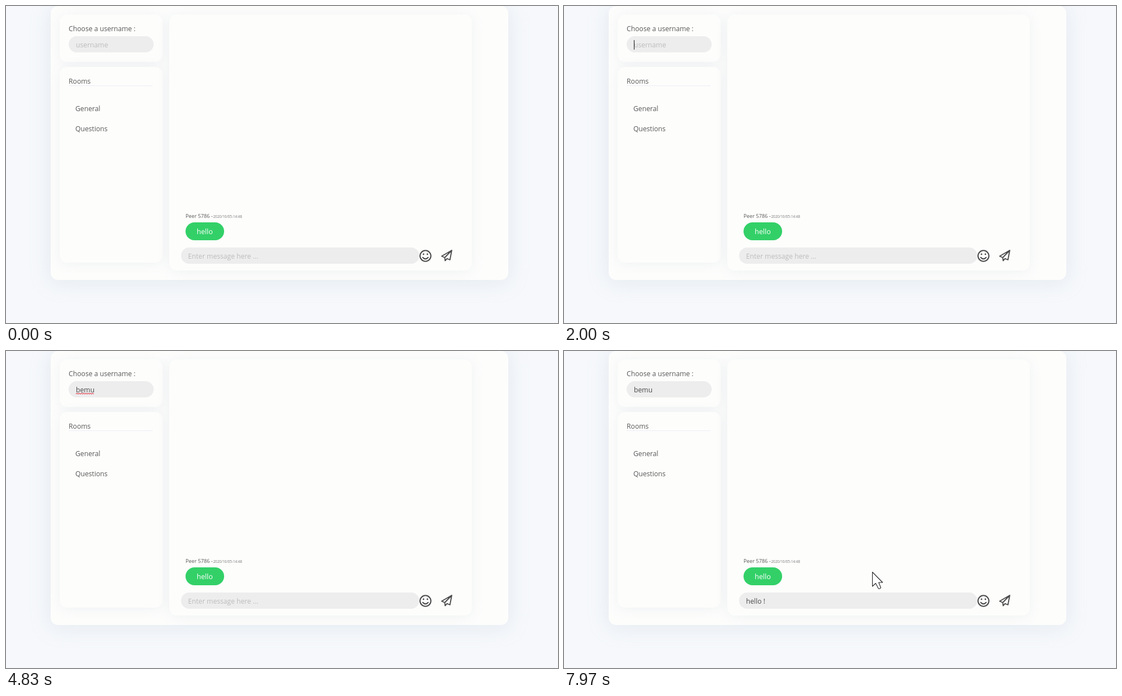
Recreate the animation shown at these times as an HTML page. Size 987 by 567 pixels, loop 8 s.

```html
<!DOCTYPE html>
<html lang="en">
<head>
<meta charset="utf-8">
<title>Chat room</title>
<style>
  html, body { margin: 0; width: 100%; height: 100%; overflow: hidden; background: #f6f8fb; }
  div { position: absolute; box-sizing: border-box; }
  .card { background: #fdfdfc; border-radius: 13px; box-shadow: 0 4px 36px rgba(176, 200, 214, .27); }
  .panel { background: #fdfdfc; border-radius: 13px; box-shadow: 0 2px 22px rgba(190, 200, 216, .22); }
  .field { background: #ededee; border-radius: 15px; }
  .bubble { background: #33d068; border-radius: 16px; }
  svg { position: absolute; left: 0; top: 0; }
  text { font: 12.2px "Open Sans", "Noto Sans", sans-serif; fill: #585858; white-space: pre; }
  .hint { fill: #bcbcbc; }
  .typed { fill: #484848; }
  .icon { fill: none; stroke: #4c4c4c; stroke-width: 2.1; stroke-linejoin: round; stroke-linecap: round; }
</style>
</head>
<body>
<div class="card" style="left:80px; top:0; width:818px; height:490px"></div>
<div class="panel" style="left:96px; top:15px; width:184px; height:85px"></div>
<div class="panel" style="left:96px; top:109px; width:184px; height:350px"></div>
<div class="panel" style="left:292px; top:15px; width:541px; height:458px"></div>
<div class="field" style="left:112px; top:54px; width:152px; height:29px"></div>
<div class="field" style="left:313px; top:432px; width:426px; height:29px"></div>
<div class="bubble" style="left:321px; top:387px; width:69px; height:32px"></div>

<svg width="987" height="567" viewBox="0 0 987 567">
  <text x="112" y="45">Choose a username :</text>
  <text x="112" y="139">Rooms</text>
  <path d="M112 142.5H262" stroke="#ececf6"/>
  <text x="124" y="188">General</text>
  <text x="124" y="224">Questions</text>
  <text x="321" y="379" style="font-size:9.25px">Peer 5786 -</text>
  <text x="370.5" y="379" style="font-size:6.3px; fill:#777">2020/10/05-14:48</text>
  <text x="341" y="408" style="font-size:12.6px; fill:#fff">hello</text>

  <text id="name" x="125" y="74"></text>
  <text id="message" x="325.5" y="452"></text>
  <path id="squiggle" fill="none" stroke="#e2525c" stroke-width="1.1"/>
  <path id="caret" stroke="#333" stroke-width="1.2"/>

  <g class="icon">
    <circle cx="750" cy="447" r="9.7"/>
    <path d="M745.2 449.8Q750 455 754.8 449.8"/>
    <path d="M746.5 444h.01M753.5 444h.01" stroke-width="2.8"/>
    <path d="M797 437L779 447.5 784.5 450 785.2 455.5 788.6 451.8 793.8 454ZM797 437L784.5 450" stroke-width="1.9"/>
  </g>
  <path id="pointer" d="M.5 .5V26L6.3 20.5 11.3 30Q14 31 15.5 28.2L11.7 19H18.7Z"
        fill="#fff" stroke="#222" stroke-width="1.1" stroke-linejoin="round"/>
</svg>

<script>
const LOOP = 8000, BLINK = 530;
const el = id => document.getElementById(id);
const caret = el('caret'), squiggle = el('squiggle'), pointer = el('pointer');

const nameField = {
  node: el('name'), hint: 'username', text: 'bemu', x: 125, caretY: 61,
  focus: 1700, blur: 5200, keys: [2500, 2680, 2860, 3040]
};
const messageField = {
  node: el('message'), hint: 'Enter message here ...', text: 'hello !', x: 325.5, caretY: 438,
  focus: 5200, blur: LOOP, keys: [6100, 6280, 6440, 6600, 6800, 7000, 7200]
};

// Pointer stops: time, x, y
const stops = [[3850, 190, 70], [4330, 468, 277], [4850, 500, 445], [7680, 500, 445], [7970, 551, 395]];
const SPELLCHECK = 3900;

function drawField(field, t) {
  const { node, hint, text, x, caretY, focus, blur, keys } = field;
  const typed = keys.filter(k => k <= t);
  node.textContent = typed.length ? text.slice(0, typed.length) : hint;
  node.setAttribute('class', typed.length ? 'typed' : 'hint');
  if (t < focus || t >= blur) return;

  const lastInput = typed.length ? typed[typed.length - 1] : focus;
  if ((t - lastInput) % (2 * BLINK) >= BLINK) return;
  const width = typed.length ? node.getComputedTextLength() : 0;
  caret.setAttribute('d', `M${Math.round(x + width) + .5} ${caretY}v17`);
}

function drawSquiggle(t) {
  let d = '';
  if (t >= SPELLCHECK && t < nameField.blur) {
    d = 'M125 77';
    const end = nameField.node.getComputedTextLength();
    for (let i = 2; i <= end; i += 2) d += `L${125 + i} ${i % 4 ? 75.5 : 77}`;
  }
  squiggle.setAttribute('d', d);
}

function pointerAt(t) {
  const i = stops.findIndex(s => s[0] > t);
  if (i === 0) return stops[0].slice(1);
  if (i < 0) return stops[stops.length - 1].slice(1);
  const [a, b] = [stops[i - 1], stops[i]];
  const p = (t - a[0]) / (b[0] - a[0]);
  return [a[1] + (b[1] - a[1]) * p, a[2] + (b[2] - a[2]) * p];
}

function drawPointer(t) {
  const [x, y] = pointerAt(t);
  // The arrow is not shown over a text field
  const overField = (x < 264 && y > 54 && y < 83) || y > 432;
  pointer.setAttribute('visibility', overField ? 'hidden' : 'visible');
  pointer.setAttribute('transform', `translate(${x} ${y})`);
}

const start = performance.now();
function draw() {
  const t = (performance.now() - start) % LOOP;
  caret.setAttribute('d', '');
  drawField(nameField, t);
  drawField(messageField, t);
  drawSquiggle(t);
  drawPointer(t);
  requestAnimationFrame(draw);
}
draw();
</script>
</body>
</html>
```
